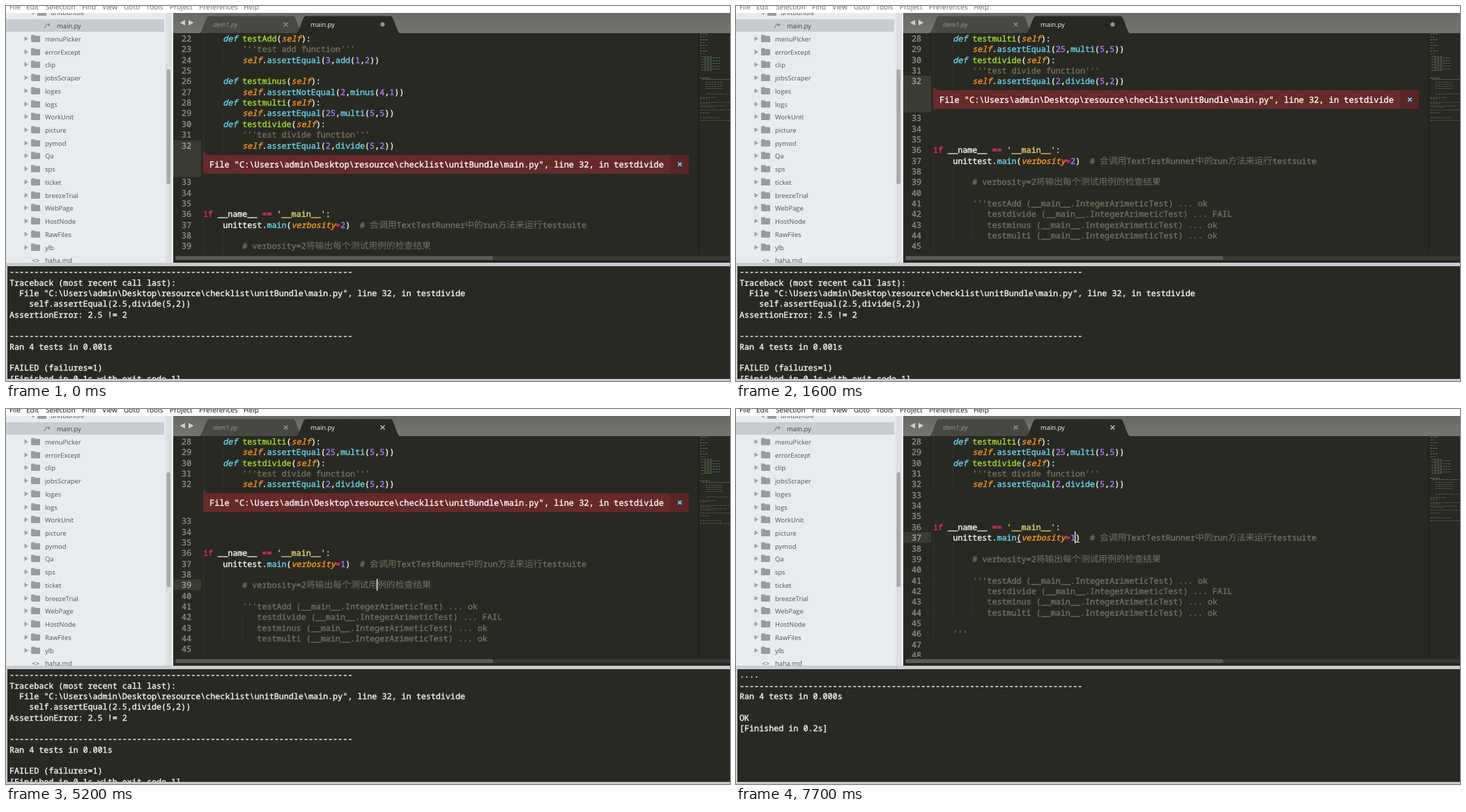
Recreate the animation shown at these times as an HTML page with a canvas. Size 1039 by 539 pixels, loop 8000 ms.

```html
<!DOCTYPE html>
<html lang="en">
<head>
<meta charset="utf-8">
<title>Code editor</title>
<style>
html, body { margin: 0; width: 100%; height: 100%; overflow: hidden; background: #fff; }
canvas { display: block; }
</style>
</head>
<body>
<canvas id="stage" width="1039" height="539"></canvas>
<script>
const ctx = document.getElementById('stage').getContext('2d');
ctx.textRendering = 'geometricPrecision';

const LOOP = 8000, SIZE = 11.72, ADV = SIZE * 0.6, PITCH = 15.35, CODE_X = 283, POPUP_GAP = 37.4;
const WHITE = '#f8f8f2', CYAN = '#66d9ef', GREY = '#75715e', BACK = '#282923';
const TRACE = 'File "C:\\Users\\admin\\Desktop\\resource\\checklist\\unitBundle\\main.py", line 32, in testdivide';
const RULE = '-'.repeat(70);

const menu = [['File', 5], ['Edit', 29], ['Selection', 57], ['Find', 109], ['View', 138], ['Goto', 169],
  ['Tools', 201], ['Project', 235], ['Preferences', 277], ['Help', 341]];
const folders = ['menuPicker', 'errorExcept', 'clip', 'jobsScraper', 'loges', 'logs', 'WorkUnit', 'picture',
  'pymod', 'Qa', 'sps', 'ticket', 'breezeTrial', 'WebPage', 'HostNode', 'RawFiles', 'ylb'];

const FIRST = 22;
const code = `    def testAdd(self):
        '''test add function'''
        self.assertEqual(3,add(1,2))

    def testminus(self):
        self.assertNotEqual(2,minus(4,1))
    def testmulti(self):
        self.assertEqual(25,multi(5,5))
    def testdivide(self):
        '''test divide function'''
        self.assertEqual(2,divide(5,2))



if __name__ == '__main__':
    unittest.main(verbosity=@)  # 会调用TextTestRunner中的run方法来运行testsuite

        # verbosity=2将输出每个测试用例的检查结果

        '''testAdd (__main__.IntegerArimeticTest) ... ok
           testdivide (__main__.IntegerArimeticTest) ... FAIL
           testminus (__main__.IntegerArimeticTest) ... ok
           testmulti (__main__.IntegerArimeticTest) ... ok

    '''

`.split('\n');

const failed = [RULE, 'Traceback (most recent call last):', '  ' + TRACE, '    self.assertEqual(2.5,divide(5,2))',
  'AssertionError: 2.5 != 2', '', RULE, 'Ran 4 tests in 0.001s', '', 'FAILED (failures=1)',
  '[Finished in 0.1s with exit code 1]'];
const passed = ['....', RULE, 'Ran 4 tests in 0.000s', '', 'OK', '[Finished in 0.2s]'];

// Each capture group takes the style at the same index.
const syntax = /(#.*|'''.*)|('.*?')|(def\b)|(self|verbosity)|(\d+)|(if\b|=+)|(test\w+(?=\(self))|(\w+(?=\())|(\w+|[^\w\s])/g;
const styles = [[GREY], ['#e6db74'], [CYAN, 'italic '], ['#fd971f', 'italic '], ['#ae81ff'], ['#f92672'],
  ['#a6e22e'], [CYAN], [WHITE]];

// Caret opacity from each time on
const blink = [[0, 0], [2200, 1], [2700, .5], [2800, 0], [3200, 1], [3800, .5], [3900, 0], [4000, 1], [4500, .5],
  [4600, 0], [5100, .5], [5200, 1], [5500, .5], [5700, 0], [6000, .3], [6100, .7], [6200, 1], [6400, .7],
  [6500, .3], [6600, 0], [7000, .3], [7100, .7], [7200, 1], [7400, .5], [7500, 0], [7700, 1]];
const at = (steps, t) => steps.findLast(s => s[0] <= t)[1];

function box(x, y, w, h, color) {
  ctx.fillStyle = color;
  ctx.fillRect(x, y, w, h);
}

function pill(x, y, w, h, color, r = 2.5) {
  ctx.fillStyle = color;
  ctx.beginPath();
  ctx.roundRect(x, y, w, h, r);
  ctx.fill();
}

function poly(color, ...p) {
  ctx.fillStyle = color;
  ctx.beginPath();
  for (let i = 0; i < p.length; i += 2) ctx.lineTo(p[i], p[i + 1]);
  ctx.fill();
}

function cross(x, y, r, color, width = 1.4) {
  ctx.strokeStyle = color;
  ctx.lineWidth = width;
  ctx.beginPath();
  for (const s of [1, -1]) {
    ctx.moveTo(x - r, y - r * s);
    ctx.lineTo(x + r, y + r * s);
  }
  ctx.stroke();
}

function clipped(x, y, w, h, paint) {
  ctx.save();
  ctx.beginPath();
  ctx.rect(x, y, w, h);
  ctx.clip();
  paint();
  ctx.restore();
}

function label(text, x, y, color, size = 9.4, style = '') {
  ctx.font = `${style}${size}px "Open Sans", "Noto Sans", sans-serif`;
  ctx.fillStyle = color;
  ctx.fillText(text, x, y);
}

// Fixed-pitch text, laid out word by word; wide characters take a full em.
// A hairline outline thickens the narrow letters.
function mono(text, x, y, color, style = '', size = SIZE) {
  ctx.fillStyle = ctx.strokeStyle = color;
  ctx.lineWidth = 0.35;
  for (const run of text.match(/[!-~]+|[^!-~]/g) || []) {
    const wide = run > '~';
    ctx.font = wide ? '12.8px "Noto Sans CJK SC", "Noto Sans CJK JP", sans-serif'
      : `${style}${size}px "Noto Sans Mono", "DejaVu Sans Mono", monospace`;
    if (run !== ' ') ctx.fillText(run, x, y);
    if (run !== ' ' && !wide) ctx.strokeText(run, x, y);
    x += wide ? 12.8 : run.length * size * 0.6;
  }
}

function folder(x, y) {
  pill(x, y - 5, 6, 4, '#9a9b9d', 1);
  pill(x, y - 3.5, 13, 9, '#9a9b9d', 1);
}

function sidebar() {
  box(0, 10, 240, 359, '#e9ecee');
  box(0, 19, 227, 18, '#c9cdd2');
  poly('#9fa3a6', 36, 9, 42, 9, 39, 13);
  folder(45, 8.5);
  const ink = '#4d5358';
  label('unitBundle', 64, 13.2, ink);
  label('/*', 55, 31.8, ink, 9.4, 'italic ');
  label('main.py', 73, 31.8, '#3d4247');
  folders.forEach((name, i) => {
    const y = Math.round(46.9 + 18.73 * i);
    poly('#9fa3a6', 26.5, y - 3.5, 32, y, 26.5, y + 3.5);
    folder(36, y - .5);
    label(name, 56, y + 3.5, ink);
  });
  label('<>', 37.5, 369, ink, 9);
  label('haha.md', 56, 368.8, ink);
  box(229, 10, 9, 359, '#dde0e3');
  pill(230.5, 91, 5.5, 165, '#a6a8aa');
  box(238, 10, 2, 359, '#f1f3f4');
}

function tab(left, right, color) {
  ctx.fillStyle = color;
  ctx.beginPath();
  ctx.moveTo(left, 39);
  ctx.bezierCurveTo(left + 5, 36, left + 8, 15, left + 13, 14.5);
  ctx.lineTo(right - 13, 14.5);
  ctx.bezierCurveTo(right - 8, 15, right - 5, 36, right, 39);
  ctx.fill();
}

function tabs(saved) {
  const shade = ctx.createLinearGradient(0, 10, 0, 39);
  shade.addColorStop(0, '#686965');
  shade.addColorStop(1, '#747571');
  box(240, 10, 799, 29, shade);
  poly('#cfcfcc', 257, 20, 257, 28, 249.5, 24);
  poly('#cfcfcc', 262, 20, 262, 28, 269.5, 24);
  tab(278, 425, '#474842');
  tab(417, 565, BACK);
  label('dem1.py', 297, 30.2, '#96978f', 9.4, 'italic ');
  label('main.py', 437, 30.2, '#f4f4f0');
  cross(401.5, 26.5, 2.8, '#94958e');
  if (saved) cross(540.5, 26.5, 3, '#c4c5bf');
  else pill(537.5, 23.5, 6, 6, '#96978f', 3);
}

function popup(base) {
  const red = '#662a28', top = base + 9;
  poly(red, 283, top - 6, 290, top + 1, 283, top + 1);
  box(283, top, 697, 27, red);
  box(953, top, 27, 27, '#592624');
  mono(TRACE, 292, base + 27, '#fff', '', 11.94);
  cross(967, top + 13.5, 2.6, CYAN, 1.6);
}

function guides(i, y) {
  let next = i;
  while (next < code.length && !code[next]) next++;
  const indent = (code[next] || '').search(/\S/);
  for (let col = 0; col < indent; col += 4) box(Math.round(CODE_X + col * ADV), y - 12, 1, PITCH, '#33342d');
}

function editor(t) {
  const scroll = t < 1500 ? 0 : t < 1600 ? 36 : 6 * PITCH;
  const active = t < 2200 ? 32 : t < 4000 ? 37 : t < 7700 ? 39 : 37;
  const digit = t < 3200 ? '2' : t < 3500 ? '' : '1';
  const gap = t < 5300 ? POPUP_GAP : 0;
  const baseOf = n => Math.round(51 + PITCH * (n - FIRST) - scroll + (n > 32 ? gap : 0));

  box(240, 39, 799, 330, BACK);
  clipped(240, 39, 755, 317, () => {
    const y = baseOf(active);
    box(240, y - 12, 40, Math.round(PITCH + (active === 32 ? gap : 0)), '#3a3b32');
    code.forEach((line, i) => {
      const n = FIRST + i, base = baseOf(n);
      guides(i, base);
      mono(String(n), 252, base, n === active ? '#a3a49d' : '#8f908a');
      if (n > 40) return mono(line, CODE_X, base, GREY);
      for (const m of line.replace('@', digit).matchAll(syntax)) {
        const [color, style] = styles[m.slice(1).findIndex(Boolean)];
        mono(m[0], CODE_X + m.index * ADV, base, color, style);
      }
    });
    if (gap) popup(baseOf(32));
    const end = CODE_X + (28 + digit.length) * ADV;
    if (active === 37) for (const x of [CODE_X + 17 * ADV, end]) box(x, y + 2, 6.5, 1, '#d8d8d0');
    ctx.globalAlpha = at(blink, t);
    box(active === 39 ? 532 : Math.floor(end), y - 13, 1.3, 17, WHITE);
    ctx.globalAlpha = 1;
  });
  minimap(gap ? 0 : -4);
  box(240, 357, 799, 12, BACK);
  pill(243, 359.5, 796, 5.5, '#383934');
  pill(243, 359.5, 456, 5.5, '#5b5c58');
}

function minimap(shift) {
  box(993, 39, 2, 317, '#20211c');
  const row = (y, x, w, color) => {
    ctx.strokeStyle = color;
    ctx.beginPath();
    ctx.moveTo(x, y + .5);
    ctx.lineTo(x + w, y + .5);
    ctx.stroke();
  };
  ctx.save();
  ctx.lineWidth = 1;
  ctx.setLineDash([3, 1]);
  ctx.globalAlpha = .45;
  for (let k = 0; k < 8; k++) row(40 + k * 4, 996, k % 2 ? 8 : 12, k % 2 ? '#b0647c' : '#a9aaa2');
  for (let k = 0; k < 11; k++) {
    const body = k % 2;
    row(72 + k * 2, body ? 1002 : 998, body ? 24 : 15, body ? '#7fa9a8' : '#93bb47');
  }
  row(103 + shift, 996, 14, '#d0d0c8');
  row(105 + shift, 999, 40, '#a9aaa2');
  for (let k = 0; k < 4; k++) row(109 + k * 3 + shift, 1004, 25, '#8a8674');
  for (const [y, x, w] of [[126, 1004, 33], [131, 996, 24], [133, 996, 12], [138, 996, 43], [140, 996, 15],
    [143, 996, 38], [145, 998, 18], [149, 996, 43], [153, 996, 14], [160, 996, 30], [164, 996, 43]])
    row(y + shift, x, w, '#8a8674');
  ctx.restore();
}

function output(t) {
  box(0, 369, 1039, 170, '#c9ccd0');
  box(2, 374, 1037, 162, BACK);
  const lines = t < 5300 ? failed : t < 5500 ? [] : passed;
  clipped(2, 374, 1037, 162, () =>
    lines.forEach((line, i) => mono(line, 5, Math.round(386.2 + PITCH * i), WHITE)));
}

function draw(now) {
  const t = now % LOOP;
  box(0, 0, 1039, 539, '#fff');
  for (const [text, x] of menu) label(text, x, 5.4, t < 2200 ? '#6a6a6a' : '#111', 10.1);
  clipped(0, 10, 240, 359, sidebar);
  tabs(t >= 4900);
  editor(t);
  output(t);
  requestAnimationFrame(draw);
}
requestAnimationFrame(draw);
</script>
</body>
</html>
```
